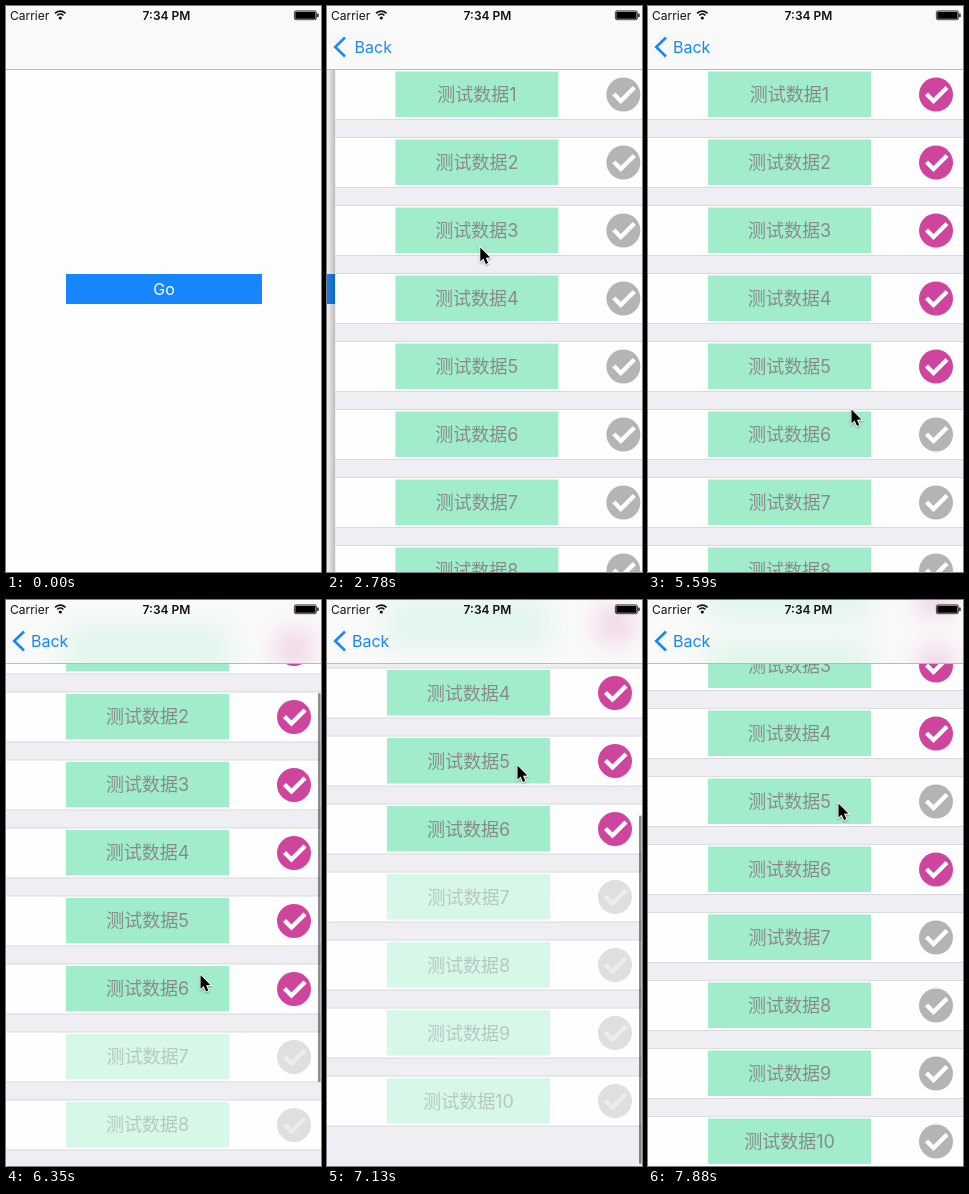
These frames come from a looping animation (315x566 px, 8 s). An HTML page with a canvas:

```html
<!DOCTYPE html>
<html lang="zh">
<head>
<meta charset="utf-8">
<title>List selection</title>
<style>
html, body { margin: 0; width: 100%; height: 100%; overflow: hidden; background: #fdfdfd; }
canvas { display: block; width: 315px; height: 566px; }
</style>
</head>
<body>
<canvas id="stage"></canvas>
<script>
const W = 315, H = 566, LOOP = 8000;
const NAV = 63, STEP = 68, ROWS = 10, MAX = 159;
const BLUE = '#1786fc', GREEN = '#a0eccb', PINK = '#cf449c', GRAY = '#b4b4b4';
const UI = 'Inter, "Noto Sans CJK SC", "Noto Sans CJK", sans-serif';

const canvas = document.getElementById('stage');
const ctx = canvas.getContext('2d');
const dpr = window.devicePixelRatio || 1;
canvas.width = W * dpr;
canvas.height = H * dpr;

const clamp = v => Math.max(0, Math.min(1, v));
const ramp = (t, a, b) => clamp((t - a) / (b - a));
const smooth = u => u * u * (3 - 2 * u);

// Moment each row is ticked; row 5 is unticked again later.
const TICKS = [3960, 3380, 4560, 4970, 5510, 5930];
const UNTICK = 7880;

// Pointer stops: time, x, y
const PATH = [
  [1460, 246, 363], [1910, 151, 281], [2500, 151, 281], [3140, 156, 170],
  [3400, 156, 170], [3850, 159, 97], [4110, 159, 97], [4350, 188, 219],
  [4540, 188, 219], [4680, 201, 296], [4980, 201, 296], [5300, 204, 361],
  [5500, 204, 361], [5590, 203, 403], [5760, 195, 424], [6110, 195, 424],
  [6842, 190, 165], [7130, 190, 165], [7560, 190, 203]
];

// The screen refreshes about every 55 ms during motion.
function snap(t) {
  const base = t < 4100 ? 2320 : t < 5000 ? 4350 : t < 6000 ? 5590 : t < 7000 ? 6590 : 7130;
  return base + Math.floor((t - base) / 55) * 55;
}

function pointer(t) {
  let a = PATH[0];
  for (const b of PATH) {
    if (t < b[0]) {
      const u = smooth(ramp(t, a[0], b[0]));
      return { x: a[1] + (b[1] - a[1]) * u, y: a[2] + (b[2] - a[2]) * u };
    }
    a = b;
  }
  return { x: a[1], y: a[2] };
}

// Drag follows the pointer, resists past the end, then springs back.
function scrollAt(t) {
  if (t < 6110) return 0;
  if (t >= 7130) {
    const k = (t - 7130) * 0.013;
    return MAX + 40.5 * (1 + k) * Math.exp(-k);
  }
  const raw = Math.max(0, 414 - pointer(t).y);
  if (raw <= MAX) return raw;
  const pull = (raw - MAX) * 0.55, d = H - 64;
  return MAX + pull * d / (pull + d);
}

function pushAt(t) {
  if (t < 2290) return 0;
  if (t > 3060) return 1;
  const k = (t - 2290) * 0.0117;
  return 1 - (1 + k) * Math.exp(-k);
}

function isTicked(i, t) {
  return t >= TICKS[i] && !(i === 4 && t >= UNTICK);
}

function rect(x, y, w, h, color) {
  ctx.fillStyle = color;
  ctx.fillRect(x, y, w, h);
}

function text(str, x, y, font, color, align = 'left') {
  ctx.font = font + ' ' + UI;
  ctx.fillStyle = color;
  ctx.textAlign = align;
  ctx.fillText(str, x, y);
}

function line(points, color, width) {
  ctx.beginPath();
  points.forEach(([x, y]) => ctx.lineTo(x, y));
  ctx.strokeStyle = color;
  ctx.lineWidth = width;
  ctx.stroke();
}

function disc(x, y, r, color) {
  ctx.beginPath();
  ctx.arc(x, y, r, 0, Math.PI * 2);
  ctx.fillStyle = color;
  ctx.fill();
}

function drawHome(t, p) {
  rect(0, 0, W, H, '#fdfdfd');
  ctx.save();
  ctx.translate(-W * 0.3 * p, 0);
  rect(60, 268, 196, 30, BLUE);
  ctx.globalAlpha = t >= 2060 ? 0.25 : 1;
  text('Go', 158, 289, '16px', '#fff', 'center');
  ctx.restore();
}

function drawRow(i, y, t) {
  rect(0, y, W, 51, '#d9d9dd');
  rect(0, y + 1, W, 49, '#fefefe');
  const on = isTicked(i, t);
  const full = t >= TICKS[5] && t < UNTICK;
  ctx.save();
  ctx.globalAlpha = full && i > 5 ? 0.42 : 1;
  rect(60, y + 2.5, 163, 45.5, GREEN);
  text('测试数据' + (i + 1), 141.5, y + 32, '18px', '#888b89', 'center');
  disc(288, y + 25.5, 17, on ? PINK : GRAY);
  line([[278.5, y + 25], [285.5, y + 32], [299, y + 18.5]], '#fff', 4.4);
  ctx.restore();
}

function drawBar(t, scroll) {
  const flash = ramp(t, 2900, 3050) * (1 - ramp(t, 3380, 3660));
  const drag = t < 6165 ? 0 : 1 - ramp(t, 7500, 7760);
  const alpha = Math.max(flash, drag);
  if (!alpha) return;
  const over = Math.max(0, scroll - MAX);
  const top = 66 + 109 * Math.min(1, scroll / MAX);
  ctx.globalAlpha = alpha;
  ctx.beginPath();
  ctx.roundRect(312, top + over, 2.6, 389 - over, 1.3);
  ctx.fillStyle = 'rgba(0,0,0,.45)';
  ctx.fill();
  ctx.globalAlpha = 1;
}

function drawList(t, p, scroll) {
  const left = W * (1 - p);
  ctx.save();
  if (p < 1) {
    const g = ctx.createLinearGradient(left - 7, 0, left, 0);
    g.addColorStop(0, 'rgba(0,0,0,0)');
    g.addColorStop(1, 'rgba(0,0,0,.2)');
    rect(0, 0, left, H, `rgba(0,0,0,${0.08 * p})`);
    rect(left - 7, 0, 7, H, g);
  }
  ctx.translate(left, 0);
  rect(0, 0, W, H, '#eeeef3');
  for (let i = 0; i < ROWS; i++) {
    const y = NAV + STEP * i - scroll;
    if (y > -60 && y < H) drawRow(i, y, t);
  }
  drawBar(t, scroll);
  ctx.restore();
}

// Soft colour of rows that pass beneath the translucent bar.
function drawNavGlow(t, scroll) {
  ctx.save();
  ctx.filter = `blur(${14 * dpr}px)`;
  for (let i = 0; i < ROWS; i++) {
    const y = NAV + STEP * i - scroll;
    if (y < -80 || y > NAV - 4) continue;
    rect(60, y + 2.5, 163, 45.5, GREEN);
    disc(288, y + 25.5, 17, isTicked(i, t) ? PINK : GRAY);
  }
  ctx.restore();
}

function drawNav(t, p, scroll) {
  ctx.save();
  ctx.beginPath();
  ctx.rect(0, 0, W, NAV);
  ctx.clip();
  rect(0, 0, W, NAV, '#fcfcfc');
  if (scroll > 0) drawNavGlow(t, scroll);
  rect(0, 0, W, NAV, `rgba(249,249,250,${scroll > 0 ? 0.7 : 0.85})`);
  ctx.restore();
  rect(0, NAV, W, 1, '#b9b9bb');
  if (p > 0) {
    ctx.globalAlpha = p;
    line([[18, 31.5], [8.2, 41], [18, 50.5]], BLUE, 2.6);
    text('Back', 25 + 98 * (1 - p), 47, '16px', BLUE);
    ctx.globalAlpha = 1;
  }
}

function drawStatus() {
  text('Carrier', 4, 13.5, '12px', '#111');
  text('7:34 PM', 160.5, 13.5, '600 12px', '#111', 'center');
  disc(54.3, 12, 1.6, '#111');
  ctx.strokeStyle = '#111';
  ctx.lineWidth = 1.6;
  for (const r of [4.2, 7.2]) {
    ctx.beginPath();
    ctx.arc(54.3, 12.3, r, -Math.PI * 0.76, -Math.PI * 0.24);
    ctx.stroke();
  }
  ctx.lineWidth = 0.8;
  ctx.beginPath();
  ctx.roundRect(288.4, 4.9, 22, 8.8, 1.6);
  ctx.stroke();
  rect(289.3, 5.8, 20.2, 7, '#000');
  rect(311.2, 7.6, 1.4, 3.4, '#111');
}

function drawPointer({ x, y }) {
  ctx.save();
  ctx.translate(x, y);
  ctx.beginPath();
  const shape = [[0.5, 0.5], [0.5, 14.5], [3.6, 11.6], [6, 17], [8.3, 16], [6, 10.8], [10.4, 10.6]];
  shape.forEach(([a, b]) => ctx.lineTo(a, b));
  ctx.closePath();
  ctx.shadowColor = 'rgba(0,0,0,.35)';
  ctx.shadowBlur = 2 * dpr;
  ctx.shadowOffsetY = dpr;
  ctx.strokeStyle = '#fff';
  ctx.lineWidth = 1.8;
  ctx.stroke();
  ctx.shadowColor = 'transparent';
  ctx.fillStyle = '#000';
  ctx.fill();
  ctx.restore();
}

function draw(t) {
  const s = snap(t);
  const p = pushAt(s), scroll = scrollAt(s);
  ctx.setTransform(dpr, 0, 0, dpr, 0, 0);
  if (p < 1) drawHome(t, p);
  if (p > 0) drawList(t, p, scroll);
  drawNav(t, p, scroll);
  drawStatus();
  if (t >= 1290) drawPointer(pointer(s));
}

const start = performance.now();
function frame() {
  draw((performance.now() - start) % LOOP);
  requestAnimationFrame(frame);
}
frame();
</script>
</body>
</html>
```
